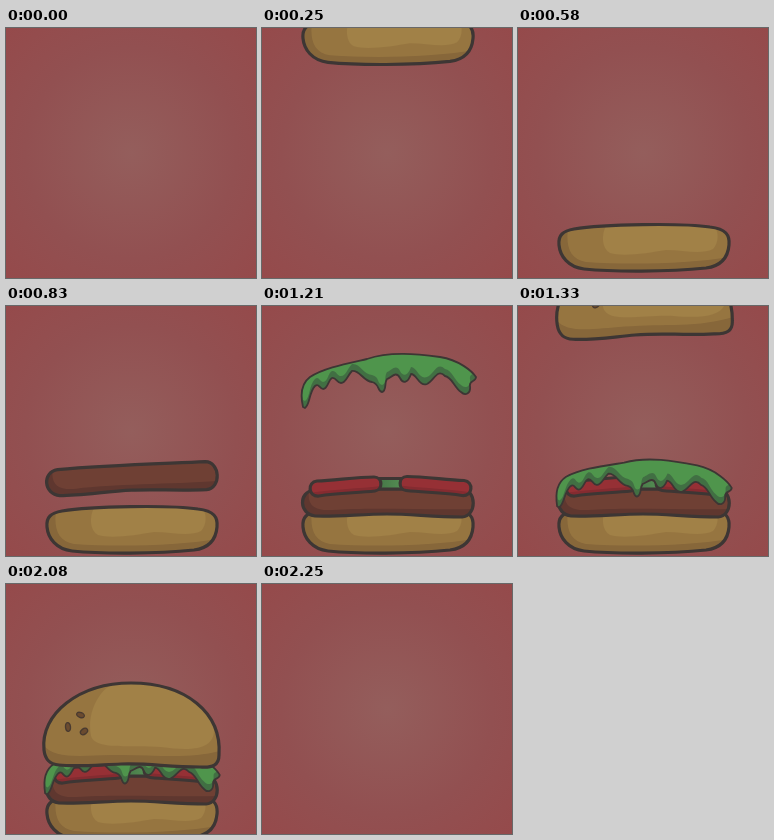
Recreate the animation shown at these times as an HTML page. Size 250x250 px, loop 2540 ms.

```html
<!DOCTYPE html>
<html lang="en">
<head>
<meta charset="utf-8">
<title>Burger stack</title>
<style>
html, body { margin: 0; width: 100%; height: 100%; overflow: hidden; background: #924d4e; }
svg { display: block; width: 100%; height: 100%; }
.line { fill: none; stroke: #3d3634; stroke-width: 3.2; stroke-linejoin: round; }
.bun { fill: #967540; }
.light { fill: #a18147; }
.shade { fill: #87673a; }
.meat { fill: #6f4034; }
.meat-shade { fill: #5f372f; }
.tomato { fill: #963035; }
.tomato-shade { fill: #842b30; }
.leaf { fill: #4f954c; }
.leaf-shade { fill: #416f43; }
.seed { fill: #6b4b2f; stroke: #493a30; stroke-width: 1.3; }
</style>
</head>
<body>
<svg viewBox="0 0 250 250">
  <defs>
    <radialGradient id="glow" gradientUnits="userSpaceOnUse" cx="125" cy="125" r="176">
      <stop offset="0" stop-color="#945e5c"/>
      <stop offset=".6" stop-color="#925051"/>
      <stop offset="1" stop-color="#954a4b"/>
    </radialGradient>
    <linearGradient id="pickle">
      <stop offset="0" stop-color="#416f43"/>
      <stop offset="1" stop-color="#599457"/>
    </linearGradient>
    <path id="base" d="M56 205C85 200 165 199 192 203C208 205 212 211 211 221C210 233 203 242 188 244C150 248 95 248 66 245C50 243 42 232 41 221C40 211 45 207 56 205Z"/>
    <path id="patty" d="M52 184C100 182 155 183 200 183C215 184 215 210 200 211C170 211 150 208 125 208C100 208 75 211 53 210C37 208 36 186 52 184Z"/>
    <path id="slice" d="M55 175C75 174 95 171 112 171C121 171 121 184 113 185C95 187 75 187 57 190C46 191 45 176 55 175Z"/>
    <path id="lettuce" d="M41 101C38 88 40 77 48 71C62 62 83 58 105 53C128 45 155 48 178 51C197 54 210 65 214 71C214 76 207 74 208 80C209 88 203 90 199 86C192 81 190 71 183 70C175 62 172 75 165 78C157 81 155 68 149 68C146 77 141 78 138 72C134 64 129 72 125 73C122 77 125 85 120 86C115 85 118 78 110 76C101 75 98 64 90 65C85 70 84 77 79 77C75 77 74 71 70 72C66 74 66 83 61 83C57 82 57 77 53 80C47 86 48 99 43 102Z"/>
    <path id="crown" d="M38 157C34 121 73 90 125 90C180 90 216 120 213 162C213 172 207 175 194 174C160 174 145 170 115 171C90 172 70 174 53 172C43 171 39 166 38 157Z"/>
    <clipPath id="in-base"><use href="#base"/></clipPath>
    <clipPath id="in-patty"><use href="#patty"/></clipPath>
    <clipPath id="in-slice"><use href="#slice"/></clipPath>
    <clipPath id="in-lettuce"><use href="#lettuce"/></clipPath>
    <clipPath id="in-crown"><use href="#crown"/></clipPath>
    <g id="tomato">
      <use href="#slice" class="tomato"/>
      <path class="tomato-shade" clip-path="url(#in-slice)" d="M46 187C75 183 95 183 120 180V193H46Z"/>
      <use href="#slice" class="line"/>
    </g>
  </defs>
  <rect width="250" height="250" fill="url(#glow)"/>
  <g id="stack">
    <g class="part">
      <g clip-path="url(#in-base)">
        <use href="#base" class="bun"/>
        <path class="shade" d="M38 200H51C47 219 50 235 68 238C110 241 170 240 212 233V250H38Z"/>
        <path class="light" d="M88 202C83 211 84 225 92 229C105 233 130 229 148 226C166 226 183 231 195 225C201 219 201 207 196 202Z"/>
      </g>
      <use href="#base" class="line"/>
    </g>
    <g class="part">
      <g clip-path="url(#in-patty)">
        <use href="#patty" class="meat"/>
        <path class="meat-shade" d="M38 180H48C43 199 52 205 70 204C105 201 165 204 213 203V214H38Z"/>
      </g>
      <use href="#patty" class="line"/>
    </g>
    <g class="part">
      <rect x="108" y="172.500" width="40" height="10.500" rx="3" fill="url(#pickle)" stroke="#3d3634" stroke-width="2.800"/>
    </g>
    <g class="part"><use href="#tomato"/></g>
    <g class="part"><use href="#tomato" transform="matrix(-1 0 0 1 257 -.5)"/></g>
    <g class="part">
      <g transform="translate(0 105) rotate(3.800 126 70)">
        <use href="#lettuce" class="leaf-shade"/>
        <g clip-path="url(#in-lettuce)"><use href="#lettuce" class="leaf" y="-7"/></g>
        <use href="#lettuce" class="line" style="stroke-width:1.800"/>
      </g>
    </g>
    <g class="part">
      <g clip-path="url(#in-crown)">
        <use href="#crown" class="bun"/>
        <path class="shade" d="M36 150C46 166 70 163 105 162C145 161 180 167 214 158V180H36Z"/>
        <path class="light" d="M112 88C90 97 81 123 85 143C90 158 125 151 155 154C190 159 208 155 208 137C203 105 155 86 112 88Z"/>
      </g>
      <use href="#crown" class="line"/>
      <ellipse class="seed" rx="4" ry="2.500" transform="translate(74.500 122) rotate(20)"/>
      <ellipse class="seed" rx="2.500" ry="4.400" transform="translate(62 134) rotate(-8)"/>
      <ellipse class="seed" rx="4" ry="2.700" transform="translate(78 138.500) rotate(-38)"/>
    </g>
  </g>
</svg>
<script>
const LOOP = 2540, TICKS = 61, EXIT = 49;
const stack = document.getElementById("stack");
const parts = document.querySelectorAll(".part");

// Times in ticks, distances in pixels; a negative bounce sinks below rest.
const drops = [
  { start: 4, land: 9.04, height: 250, bounce: 8, settle: 6, tilt: 0, pivot: 224 },
  { start: 14.5, land: 20.3, height: 237, bounce: -3, settle: 3, tilt: -2.7, pivot: 196 },
  { start: 20, land: 24, height: 200, bounce: 0, settle: 2, tilt: 0, pivot: 178 },
  { start: 21, land: 25, height: 205, bounce: 3, settle: 2, tilt: -3, pivot: 180 },
  { start: 22, land: 26, height: 205, bounce: 3, settle: 2, tilt: 3, pivot: 180 },
  { start: 26, land: 30, height: 240, bounce: 0, settle: 0.1, tilt: -3.8, pivot: 175 },
  { start: 29.5, land: 34.5, height: 190, bounce: 5, settle: 2.5, tilt: -3, pivot: 135 }
];

const clamp = v => Math.min(1, Math.max(0, v));

function place(part, drop, tick) {
  const fall = clamp((tick - drop.start) / (drop.land - drop.start));
  // Settling starts on the tick of the landing itself.
  const rest = clamp((tick - Math.floor(drop.land)) / drop.settle) * (fall === 1);
  const settled = drop.settle < 1 && fall === 1 ? 1 : rest;
  const y = -drop.height * (1 - fall * fall) - drop.bounce * Math.sin(Math.PI * settled);
  const angle = drop.tilt * (1 - settled);
  part.setAttribute("visibility", tick > drop.start ? "visible" : "hidden");
  part.setAttribute("transform", `translate(0 ${y}) rotate(${angle} 126 ${drop.pivot})`);
}

function draw(now) {
  const tick = Math.floor((now % LOOP) / LOOP * TICKS + 0.2);
  parts.forEach((part, i) => place(part, drops[i], tick));
  stack.setAttribute("transform", `translate(0 ${9 * Math.max(0, tick - EXIT) ** 2})`);
}

const begin = performance.now();
function loop() {
  draw(performance.now() - begin);
  requestAnimationFrame(loop);
}
loop();
</script>
</body>
</html>
```
